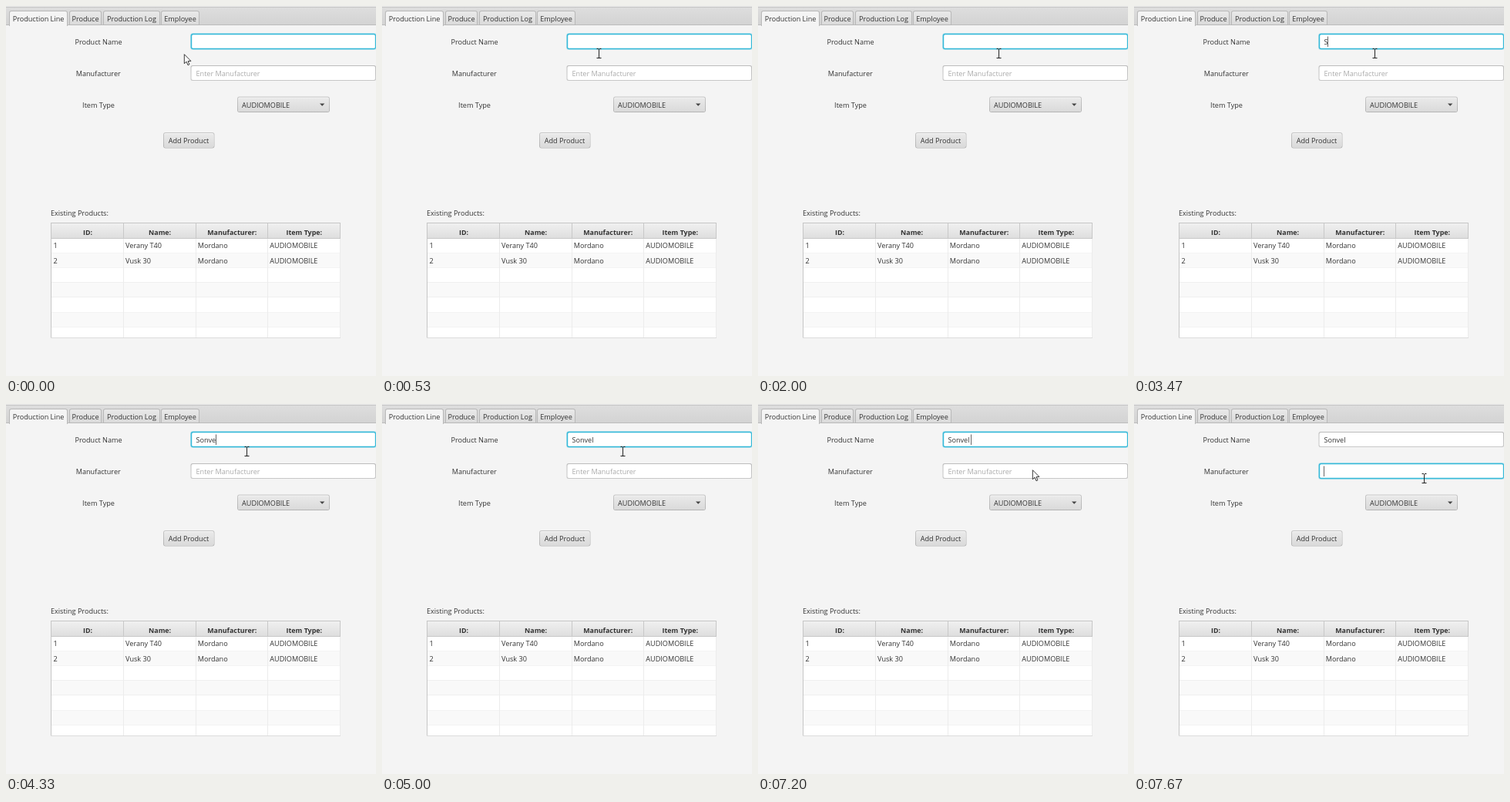
An HTML page with a canvas that plays this animation: 480x480 px, repeating every 8 s.

```html
<!DOCTYPE html>
<html lang="en">
<head>
<meta charset="utf-8">
<title>Production Line</title>
<style>
html, body { margin: 0; width: 100%; height: 100%; overflow: hidden; background: #f4f4f4; }
canvas { display: block; width: 480px; height: 480px; }
</style>
</head>
<body>
<canvas id="stage"></canvas>
<script>
const LOOP = 8000;
const FACE = '"Open Sans", "Noto Sans", sans-serif';
const INK = '#333';
const NAME = 'Sonvel ';
const KEY_TIMES = [3470, 3670, 3870, 4070, 4330, 4530, 5070];
// [from, to] spans in which the text caret is visible
const CARET = [[930, 1430], [2330, 2900], [3430, 5000], [5070, 5570],
  [6070, 6370], [6870, 7330], [7470, 8000]];
// [time, x, y] of the mouse pointer
const PATH = [[0, 231, 62], [70, 231, 62], [870, 313, 61], [1430, 313, 61],
  [1500, 312, 61], [6870, 312, 61], [7400, 376, 96], [8000, 376, 96]];
const FOCUS_MOVE = 7470;

const canvas = document.getElementById('stage');
const ctx = canvas.getContext('2d');
const dpr = window.devicePixelRatio || 1;
canvas.width = canvas.height = 480 * dpr;

function rect(x, y, w, h, fill) {
  ctx.fillStyle = fill;
  ctx.fillRect(x, y, w, h);
}

function round(x, y, w, h, r, fill) {
  ctx.fillStyle = fill;
  ctx.beginPath();
  ctx.roundRect(x, y, w, h, r);
  ctx.fill();
}

function shade(y, h, top, bottom) {
  const g = ctx.createLinearGradient(0, y, 0, y + h);
  g.addColorStop(0, top);
  g.addColorStop(1, bottom);
  return g;
}

function text(str, x, midY, { align = 'left', color = INK, weight = 400 } = {}) {
  ctx.font = `${weight} ${weight > 400 ? 8.9 : 9.1}px ${FACE}`;
  ctx.textAlign = align;
  ctx.fillStyle = color;
  ctx.fillText(str, x, midY + 3.7);
}

function button(x, y, w, h) {
  round(x, y, w, h, 3, shade(y, h, '#c6c6c6', '#b4b4b4'));
  round(x + 1, y + 1, w - 2, h - 2, 2, '#f5f5f5');
  round(x + 1, y + 2, w - 2, h - 3, 2, shade(y, h, '#ebebeb', '#d9d9d9'));
}

function tabs() {
  rect(0, 0, 480, 25, shade(0, 25, '#dedede', '#d3d3d3'));
  rect(0, 0, 480, 1, '#ececec');
  rect(0, 1, 480, 1, '#c4c4c4');
  rect(0, 24, 480, 1, '#bcbcbc');
  const list = [['Production Line', 4, 76], ['Produce', 82, 42],
    ['Production Log', 126, 74], ['Employee', 201, 50]];
  list.forEach(([label, x, w], i) => {
    round(x, 6, w, i ? 19 : 20, [3, 3, 0, 0], '#b8b8b8');
    round(x + 1, 7, w - 2, i ? 17 : 19, [2, 2, 0, 0],
      i ? shade(7, 17, '#e9e9e9', '#dadada') : '#f4f4f4');
    text(label, x + w / 2, 16, { align: 'center' });
  });
}

function field(y, focused, value, prompt) {
  if (focused) {
    round(239, y - 1, 242, 22, 3.5, 'rgba(40,185,220,.25)');
    round(239.7, y - 0.2, 240.3, 20.4, 3, '#36b9d8');
    round(241.2, y + 1.3, 237.6, 17.4, 1.5, '#fff');
  } else {
    round(239.5, y, 240.5, 20, 2.5, shade(y, 20, '#bcbcbc', '#c8c8c8'));
    round(240.5, y + 1, 238.5, 18, 2, '#fff');
  }
  if (value) text(value, 246.5, y + 10);
  else if (!focused) text(prompt, 246.5, y + 10, { color: '#aaa' });
}

function table() {
  const x = 58, y = 281, w = 376, bottom = 430, rowH = 19.25;
  const cols = [152.5, 246, 339.5, 433];
  rect(x, y, w, bottom - y + 0.5, '#c6c6c6');
  rect(x + 1, y + 1, w - 2, bottom - y - 1, '#fff');
  for (let i = 0; i < 7; i++) {
    const top = 301.3 + i * rowH;
    const h = Math.min(rowH, bottom - top);
    rect(x + 1, top, w - 2, h, i % 2 ? '#f9f9f9' : '#fff');
    if (i < 6) rect(x + 1, Math.round(top + rowH) - 1, w - 2, 1, '#f0f0f0');
  }
  rect(x + 1, y + 1, w - 2, 20, shade(y, 20, '#f1f1f1', '#dedede'));
  rect(x + 1, 301, w - 2, 1, '#c8c8c8');
  cols.forEach((c) => {
    rect(Math.floor(c), 282, 1, 19, '#c8c8c8');
    rect(Math.floor(c), 302, 1, bottom - 302, '#ececec');
  });
  ['ID:', 'Name:', 'Manufacturer:', 'Item Type:'].forEach((label, i) =>
    text(label, 106 + i * 93.6, 293, { align: 'center', weight: 700 }));
  const rows = [['1', 'Verany T40', 'Mordano', 'AUDIOMOBILE'],
    ['2', 'Vusk 30', 'Mordano', 'AUDIOMOBILE']];
  rows.forEach((row, r) => row.forEach((cell, c) =>
    text(cell, 61.5 + c * 93.6, 310.7 + r * rowH)));
}

function form(t) {
  const second = t >= FOCUS_MOVE;
  const typed = NAME.slice(0, KEY_TIMES.filter((k) => t >= k).length);
  text('Product Name', 120, 46, { align: 'center' });
  text('Manufacturer', 119.7, 87, { align: 'center' });
  text('Item Type', 120, 128, { align: 'center' });
  field(36, !second, typed, 'Enter Product Name');
  field(77, second, '', 'Enter Manufacturer');
  if (CARET.some(([a, b]) => t >= a && t < b)) {
    ctx.font = `400 9.1px ${FACE}`;
    const x = second ? 246 : 246 + ctx.measureText(typed).width;
    rect(Math.round(x), second ? 80.5 : 39.5, 1, 13.5, '#666');
  }
  button(300, 117.5, 120, 20.5);
  text('AUDIOMOBILE', 306, 128);
  ctx.fillStyle = '#444';
  ctx.beginPath();
  ctx.moveTo(407, 126.5);
  ctx.lineTo(413.4, 126.5);
  ctx.lineTo(410.2, 129.8);
  ctx.fill();
  button(204, 164, 66.5, 20.5);
  text('Add Product', 237, 174, { align: 'center' });
  text('Existing Products:', 58, 268.5);
}

function pointerAt(t) {
  const i = PATH.findIndex((p, n) => n && t < p[0]);
  const [t0, x0, y0] = PATH[i - 1];
  const [t1, x1, y1] = PATH[i];
  const u = (t - t0) / (t1 - t0);
  const e = u * u * (3 - 2 * u);
  return [Math.round(x0 + (x1 - x0) * e), Math.round(y0 + (y1 - y0) * e)];
}

function arrow(x, y) {
  const pts = [[0, 0], [0, 12], [2.8, 9.5], [4.7, 14], [6.6, 13.1], [4.8, 8.9], [8.6, 8.7]];
  ctx.beginPath();
  pts.forEach(([dx, dy]) => ctx.lineTo(x + 0.3 + dx, y + 0.7 + dy));
  ctx.closePath();
  ctx.fillStyle = '#fff';
  ctx.fill();
  ctx.strokeStyle = '#222';
  ctx.lineWidth = 0.9;
  ctx.stroke();
}

function beam(x, y) {
  rect(x, y - 5, 1, 12, '#222');
  for (const edge of [y - 6, y + 6]) {
    rect(x - 2.5, edge, 2.5, 1, '#222');
    rect(x + 1, edge, 2.5, 1, '#222');
  }
}

function pointer(t) {
  const [x, y] = pointerAt(t);
  const overField = x >= 240 && (y < 71 || y > 90);
  (overField ? beam : arrow)(x, y);
}

function draw(now) {
  const t = now % LOOP;
  ctx.setTransform(dpr, 0, 0, dpr, 0, 0);
  rect(0, 0, 480, 480, '#f4f4f4');
  tabs();
  form(t);
  table();
  pointer(t);
}

const start = performance.now();
function tick() {
  draw(performance.now() - start);
  requestAnimationFrame(tick);
}
tick();
</script>
</body>
</html>
```
